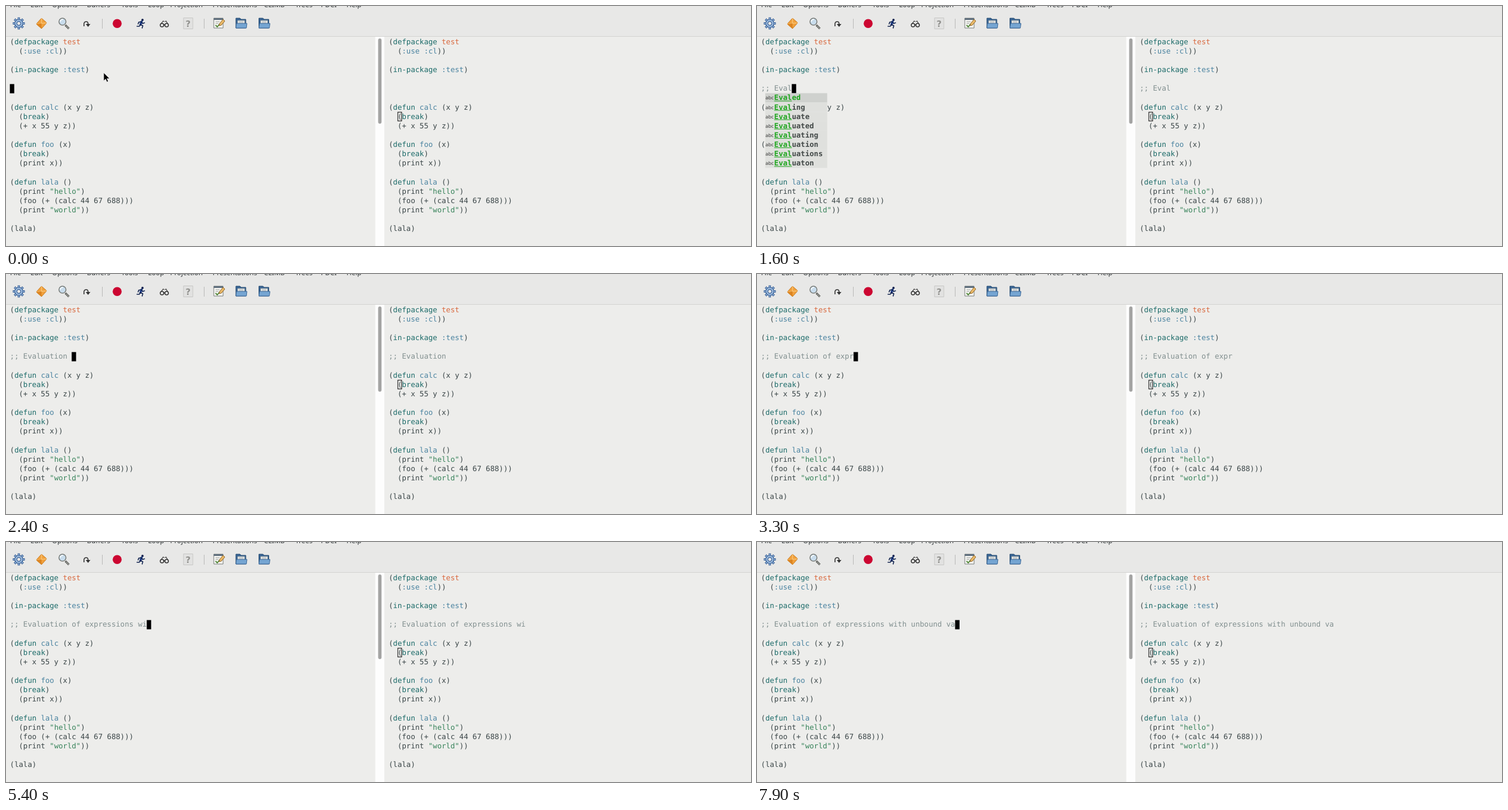
Animation of 1280x414 px, one loop 8000 ms. Source, as an HTML page with a canvas:

```html
<!DOCTYPE html>
<html>
<head>
<meta charset="utf-8">
<style>
  html, body { margin: 0; width: 100%; height: 100%; overflow: hidden; background: #ededeb; }
  canvas { display: block; }
</style>
</head>
<body>
<canvas id="stage" width="1280" height="414"></canvas>
<script>
const ctx = document.getElementById('stage').getContext('2d');
const LOOP = 8000, CHAR = 7.586, ROW = 16.13, TOP = 53.6, COMMENT_ROW = 5;
const MONO = '12.6px "DejaVu Sans Mono", monospace';
const COLORS = { plain: '#3a4547', keyword: '#1c6b69', name: '#4a83a0', type: '#d9693f', string: '#37835a', comment: '#818f8f' };

const code = `(defpackage test
  (:use :cl))

(in-package :test)



(defun calc (x y z)
  (break)
  (+ x 55 y z))

(defun foo (x)
  (break)
  (print x))

(defun lala ()
  (print "hello")
  (foo (+ (calc 44 67 688)))
  (print "world"))

(lala)`.split('\n');

const comment = ';; Evaluation of expressions with unbound va';
// [time in ms, characters typed so far]
const typing = [
  [0, 0], [200, 1], [500, 2], [700, 3], [800, 4], [1000, 5], [1200, 6], [1600, 7],
  [1800, 8], [1900, 9], [2100, 10], [2200, 11], [2400, 14], [3000, 18],
  [3200, 19], [3300, 21], [3400, 22], [3700, 23], [3800, 24], [4000, 25],
  [4100, 27], [4200, 28], [4600, 29], [5200, 30], [5400, 31], [5600, 33],
  [5700, 34], [6100, 35], [6300, 36], [6500, 37], [6600, 38], [6700, 39],
  [6800, 40], [6900, 41], [7100, 42], [7800, 43], [7900, 44]
];
const words = ['Evaled', 'Evaling', 'Evaluate', 'Evaluated', 'Evaluating', 'Evaluation', 'Evaluations', 'Evaluaton'];

const rowTop = row => TOP + row * ROW;

function rect(x, y, w, h, fill) {
  ctx.fillStyle = fill;
  ctx.fillRect(x, y, w, h);
}

function text(str, x, y, fill, font = MONO) {
  ctx.font = font;
  ctx.fillStyle = fill;
  ctx.fillText(str, x, y);
}

function shape(d, fill, stroke, width = 1) {
  const path = new Path2D(d);
  if (fill) { ctx.fillStyle = fill; ctx.fill(path); }
  if (stroke) { ctx.strokeStyle = stroke; ctx.lineWidth = width; ctx.stroke(path); }
}

function disc(x, y, r, fill, stroke, width) {
  shape(`M${x - r} ${y}a${r} ${r} 0 1 0 ${2 * r} 0a${r} ${r} 0 1 0 ${-2 * r} 0`, fill, stroke, width);
}

function at(x, y, draw) {
  ctx.save();
  ctx.translate(x, y);
  draw();
  ctx.restore();
}

function gear() {
  for (let i = 0; i < 8; i++) {
    ctx.save();
    ctx.rotate(i * Math.PI / 4);
    rect(-2, -10.3, 4, 5, '#365f96');
    rect(-1, -9.3, 2, 4, '#a9c3e2');
    ctx.restore();
  }
  disc(0, 0, 7, '#9dbbdd', '#365f96', 1.2);
  disc(0, 0, 3.4, '#e8e8e7', '#365f96', 1.2);
}

function folder() {
  shape('M-9 8V-9H-2L0-7H8V8Z', '#386494', '#244a70');
  shape('M-6-5H6V3H-6Z', '#f2f3f2', '#8e9a9f');
  shape('M-4-3H4M-4-1H4', null, '#a2aaad');
  shape('M-9 8L-8 0H10L9 8Z', '#75a5d2', '#3a6797');
}

function toolbar() {
  rect(0, 0, 1280, 52, '#e8e8e7');
  rect(0, 52, 1280, 1, '#d2d2d0');
  const menu = [['File', 7], ['Edit', 42], ['Options', 79], ['Buffers', 139], ['Tools', 198], ['Loop', 244],
    ['Projection', 282], ['Presentations', 355], ['CLIMB', 443], ['Trees', 497], ['PDCI', 541], ['Help', 585]];
  for (const [label, x] of menu) text(label, x, 1.5, '#2e3436', '11.8px "Noto Sans", sans-serif');
  rect(165, 22, 1, 17, '#b9b9b7');
  rect(340, 22, 1, 17, '#b9b9b7');

  at(22, 30, gear);
  at(61, 30, () => {
    shape('M-9 1L0-9L9-1L0 9Z', '#f1a13c', '#c77618');
    shape('M-9 1L0 0L9-1M0 0L0-9', null, '#fbd18e');
    shape('M-9 1L0 0L0 9Z', '#dc8421');
  });
  at(99, 30, () => {
    shape('M3 3L9 9', null, '#555753', 3.4);
    shape('M4 4L9 9', null, '#a5a7a3', 1.2);
    disc(-2, -3, 6, '#c8dcec', '#777b78', 1.5);
    shape('M-6-3Q-5-7-1-7', null, '#fff', 1.4);
  });
  at(138, 31, () => {
    shape('M-4 4V0Q-4-4 0-4Q3-4 3 0V1', null, '#333', 1.6);
    shape('M-1 0H7L3 5Z', '#333');
  });
  disc(191, 30.3, 7.7, '#cc0631');
  at(232, 30, () => {
    ctx.lineCap = 'round';
    disc(2.5, -6, 2, '#10224e');
    shape('M1-3L-1 2', null, '#1a3b88', 3.6);
    shape('M-1 2L3 4L2 8M-1 2L-3 5L-7 5M0-3L-4-2L-5 1M1-2L3 0L6-1', null, '#10224e', 1.6);
  });
  at(272, 31, () => {
    disc(-4, 2, 3, null, '#333', 1.5);
    disc(4, 2, 3, null, '#333', 1.5);
    shape('M-1 2Q0 0 1 2M-6 0L-2-5L0-4M6 0L3-5L1-4', null, '#333', 1.2);
  });
  at(313, 30, () => {
    shape('M-8-9.5H8V9.5H-8Z', '#e2e2e1', '#c7c7c5');
    text('?', -4.4, 5.5, '#92928f', 'bold 15px "DejaVu Sans", sans-serif');
  });
  at(366, 30, () => {
    shape('M-9-9H7V8H-9Z', '#f5f5f2', '#777b78');
    rect(-9, -9, 16, 3, '#5d6d7c');
    shape('M-6-3H1M-6 0H-1', null, '#9a9d9a');
    shape('M-6 3L-3 6L1 1', null, '#4b8333', 1.8);
    shape('M0 4L1 0L7-7L10-4L4 3Z', '#e9b969', '#8f6425');
  });
  at(404, 30, folder);
  at(443.5, 30, folder);
}

function codeLine(line, x, row) {
  const tokens = line.split(/("[^"]*"|:\w+|defpackage|defun|in-package|break|(?<=defun )\w+|(?<=defpackage )\w+)/);
  let col = 0;
  tokens.forEach((token, i) => {
    let kind = 'plain';
    if (i % 2) {
      if (token[0] === '"') kind = 'string';
      else if (/^(def|in-|break)/.test(token)) kind = 'keyword';
      else kind = token === 'test' ? 'type' : 'name';
    }
    text(token, x + col * CHAR, rowTop(row) + 12, COLORS[kind]);
    col += token.length;
  });
}

function pane(x, typed) {
  code.forEach((line, row) => codeLine(line, x, row));
  text(typed, x, rowTop(COMMENT_ROW) + 12, COLORS.comment);
}

function popup(prefix) {
  const items = words.filter(word => word.startsWith(prefix));
  const textX = 6.8 + 3 * CHAR;
  items.forEach((word, i) => {
    const y = rowTop(COMMENT_ROW + 1 + i), tailX = textX + prefix.length * CHAR;
    rect(14.2, y, 106.4, ROW, i ? '#dfe0dd' : '#cfd1ce');
    text('abc', 14.6, y + 11, '#333', '8px "DejaVu Sans", sans-serif');
    text(prefix, textX, y + 12, '#1ba51b', 'bold ' + MONO);
    rect(textX, y + 13, prefix.length * CHAR, 1, '#1ba51b');
    text(word.slice(prefix.length), tailX, y + 12, i ? '#424847' : '#1ba51b', 'bold ' + MONO);
  });
}

function render(t) {
  rect(0, 0, 1280, 414, '#ededeb');
  toolbar();

  rect(634.5, 53, 15.5, 361, '#fdfdfd');
  ctx.beginPath();
  ctx.roundRect(639.4, 56, 5.8, t < 4200 ? 147 : 146, 2.9);
  ctx.fillStyle = '#a4a4a3';
  ctx.fill();

  const count = typing.findLast(([time]) => time <= t)[1];
  const typed = comment.slice(0, count);
  pane(6.8, typed);
  pane(657.5, typed);
  rect(6.6 + count * CHAR, rowTop(COMMENT_ROW) + 0.4, 7.6, ROW - 0.2, '#000');
  ctx.strokeStyle = '#000';
  ctx.lineWidth = 1;
  ctx.strokeRect(673.2, rowTop(8) + 0.5, 6.6, ROW - 1);

  if (t >= 1600 && t < 2400) popup(typed.slice(3));
  if (t < 200) at(167.8, 115, () => shape('M0 0V14.2L3.3 11.2L5.6 16.2L8 15.1L5.8 10.3H10.3Z', '#000', '#fff', 0.8));
}

ctx.textRendering = 'geometricPrecision';
const start = performance.now();
function tick() {
  render((performance.now() - start) % LOOP);
  requestAnimationFrame(tick);
}
tick();
</script>
</body>
</html>
```
